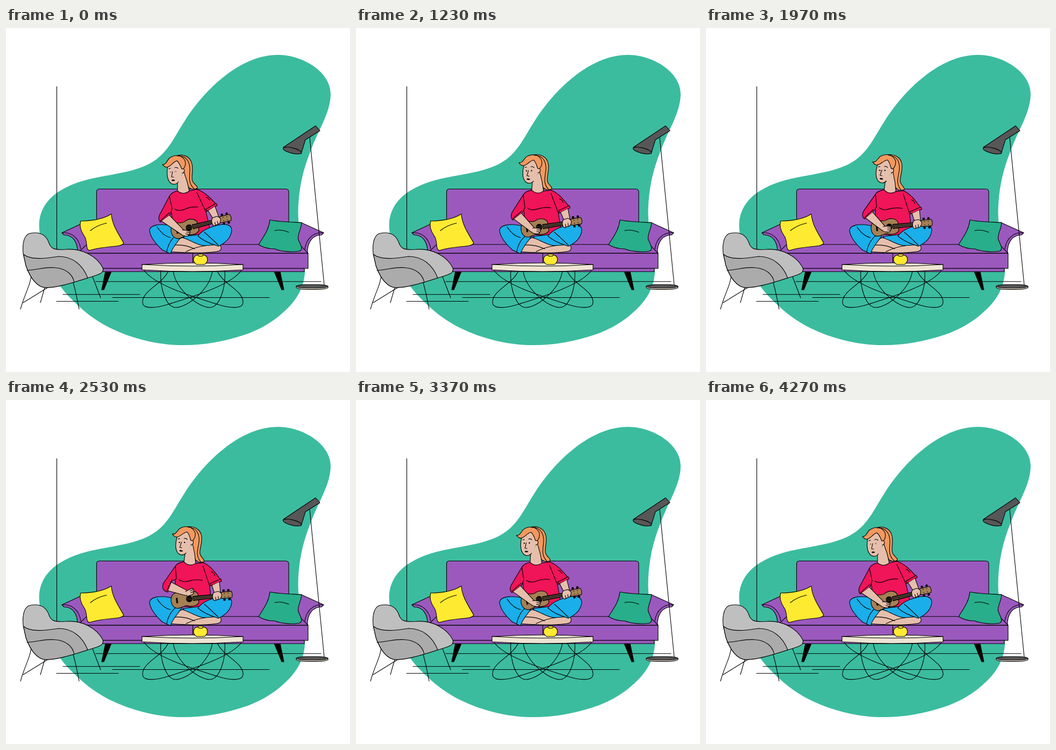
Write an HTML page that moves like this. It is 640x640 px and loops after 4.33 s.

```html
<!DOCTYPE html>
<html lang="en">
<head>
<meta charset="utf-8">
<title>Ukulele on the sofa</title>
<style>
  html, body { margin: 0; width: 100%; height: 100%; overflow: hidden; background: #fff; }
  svg { display: block; width: 100%; height: 100%; }
  .ink { stroke: #000; stroke-width: 1.1; stroke-linejoin: round; stroke-linecap: round; fill: none; }
  .ink .purple { fill: #9b59be; }
  .ink .red { fill: #f01458; }
  .ink .blue { fill: #1aaeea; }
  .ink .skin { fill: #e6bfac; }
  .ink .hair { fill: #f2995f; }
  .ink .wood { fill: #a58055; }
  .ink .yellow { fill: #ffea32; }
  .ink .dark { fill: #575757; }
  .ink .black { fill: #000; }
  .ink .cream { fill: #eee4d3; }
</style>
</head>
<body>
<svg viewBox="0 0 640 640">
  <path fill="#3bbc9f" d="M62 375C59 343 75 318 102 302C150 273 207 277 255 258C299 241 311 205 333 172C368 117 434 50 506 50C552 50 605 82 604 124C603 158 583 186 567 228C552 265 544 300 543.500 345C544 385 556 420 556 455C554 485 540 507 518 527C497 547 470 562 443 571C407 583 370 590 330 590C262 590 190 565 145 526C115 500 100 482 84 455C68 428 64 395 62 375Z"/>

  <g class="ink">
    <path d="M94.500 109V412M167 471.700H586M106 495.700H249M94 508.500H209M198 501.500H490"/>

    <!-- sofa -->
    <path class="black" d="M185 453H196L182 487H178ZM499 453H510L517 487H513Z"/>
    <path class="purple" d="M168.500 418V305Q168.500 299.500 174 299.500H520Q526 299.500 526 305V418Z"/>
    <path class="purple" d="M104 381L145 362H168V419H133C134 398 124 385 108 385Z"/>
    <path class="purple" d="M591 381L549 362L526 365V419H561C560 398 571 385 587 385Z"/>
    <path d="M104 381C121 379 136 390 139 411M591 381C574 379 559 390 556 411"/>
    <path class="purple" d="M133 419L150 402.800H546L562 419Z"/>
    <path class="purple" d="M132 419.300H562V447.300H132Z"/>
    <path class="purple" d="M168 447.300H555V453.300H168Z"/>
    <path d="M347.500 419V447"/>

    <!-- pillows -->
    <path class="yellow" d="M139 359C158 359 180 356 196 346C197 366 210 384 219 400C216 409 186 404 155 414C147 412 153 396 145 386C139 377 136 368 139 359ZM157 377Q169 367 187 363"/>
    <path fill="#28ae8b" d="M491 357C508 361 533 361 550 362C549 376 541 385 544 394C549 405 553 412 546 415C530 418 510 415 500 411C489 411 478 408 470 403C478 389 489 377 491 357ZM500 377Q511 374 526 380"/>

    <!-- floor lamp -->
    <path d="M565 204L592 478"/>
    <path class="cream" d="M540 480.500V483C542 487.500 597 487.500 599 483V480.500Z"/>
    <ellipse class="dark" cx="569.500" cy="480.500" rx="29.500" ry="3.300"/>
    <path class="dark" d="M576 182L584 191L557 208L549 234L516 222Z"/>
    <ellipse class="dark" cx="532.500" cy="228" rx="17.500" ry="5" transform="rotate(14 532.500 228)"/>

    <!-- chair -->
    <path d="M47 450C48 477 37 487 27 523M32 511L79 482M72 483L64 511M122 465Q128 480 136 523M160 460L176 502"/>
    <path fill="#bfbfbf" d="M32 420C30 400 34 384 45 382C65 378 75 386 80 400C84 412 92 413 110 412C142 409 169 425 180 446C183 455 175 458 162 462C130 472 100 482 75 483C58 483 45 465 37 442Z"/>
    <path fill="#ababab" d="M32.500 421C45 432 73 429 98 425C124 425 143 441 152 465C118 476 94 483 75 483C58 483 45 465 37 442Z"/>
    <path d="M39 451C62 449 76 444 92 446C113 448 124 459 127 473"/>
  </g>

  <g class="ink">
    <!-- torso and head -->
    <g id="body">
      <path class="hair" d="M312 241C325 231 343 238 346 253C349 266 344 276 347 285C351 293 357 293 356 298C348 302 340 300 336 290L326 262Z"/>
      <path class="red" d="M319 303Q307 306 304 313L313 385H382L372 342L392 329C380 316 370 305 355 300L341 303Z"/>
      <path class="skin" d="M319 286V303Q330 312 341 303L337 286L331 268"/>
      <path class="skin" d="M301 256C299 268 299 283 307 289C312 292 317 291 321 286L328 271C334 268 333 260 327 262L319 246Z" stroke="none"/>
      <path d="M301 256C299 268 299 283 307 289C312 292 317 291 321 286M328 270C334 268 333 260 327 262"/>
      <path class="hair" d="M291 254C298 255 299 247 304 242C317 233 329 238 333 247C335 253 333 259 330 262L327 262C324 256 323 251 318 247C310 249 307 258 299 259Q295 259 291 254Z"/>
      <path d="M318 238C338 236 343 253 342 267C341 280 340 290 350 299M314 260Q317 258 320 261M303 262L306 261M310 267L308 277L312 277.500"/>
      <ellipse class="black" cx="311" cy="283.300" rx="2.800" ry="1" stroke-width=".8"/>
      <g stroke="none" fill="#000">
        <ellipse class="eye" cx="306.300" cy="268" rx="1.200"/>
        <ellipse class="eye" cx="315.800" cy="267" rx="1.200"/>
      </g>
      <path d="M314 337Q322 342 333 337T357 333M355 306L372 342M372 315Q377 316 379 321"/>
      <path class="red" d="M391 326L393 330L374 341L372 337Z"/>
      <path id="sleeve" class="red"/>
    </g>

    <!-- legs -->
    <path class="blue" d="M329 388L362 384L397 403L350 410Z"/>
    <path class="skin" d="M304 416C309 404 318 393 328 390C341 393 352 403 368 405L398 403C402 409 401 415 392 416C364 420 332 418 304 416Z"/>
    <path d="M312 404Q332 402 351 411M335 416Q353 407 371 405"/>
    <path class="blue" d="M267 376C269 366 286 364 303 367C316 370 327 373 330 377C329 391 312 401 306 420L291 413C280 403 268 390 267 376Z"/>
    <path class="blue" d="M357 387C364 377 377 371 393 367C410 363 420 366 420 377C418 392 406 401 395 406C382 402 368 397 357 387Z"/>
    <path d="M281 370Q292 387 306 390M326 380Q304 390 299 416M369 380Q382 391 395 404"/>

    <!-- ukulele -->
    <g id="uke">
      <path class="wood" d="M17 -7C14 -15 2 -17 -5 -13C-11 -10 -16 -15 -24 -14C-37 -12 -38 12 -24 15C-16 16 -11 11 -5 12C4 16 15 14 17 8Z"/>
      <circle class="black" r="5.500"/>
      <path class="black" d="M-24 -4H-22V5H-24Z"/>
      <path fill="#2b2320" d="M7 -4L58 -3V3L7 4Z"/>
      <path stroke="#a58055" stroke-width=".5" d="M-22 -1.500H57M-22 1.500H57"/>
      <path class="wood" d="M57 -4L62 -6H79Q82 0 79 6H62L57 4Z"/>
      <path stroke-width="4.500" d="M65 -8.500h.1M74 -8.500h.1M65 8.500h.1M74 8.500h.1"/>
      <path stroke-width="1.500" d="M66 -3h.1M73 -3h.1M66 3h.1M73 3h.1"/>
    </g>

    <!-- arms -->
    <path id="fretArm" class="skin"/>
    <path id="fretHand" class="skin" d="M47 -7C43 -4 42 5 46 8C49 9 51 6 54 7C58 7 60 3 61 -2C59 -6 56 -8 54 -8ZM49 7V2M54 6V1"/>
    <path id="strumArm" class="skin"/>
    <path id="strumHand" class="skin" d="M-2 -4.500C3 -6 8 -6 13 -5Q14 -3 11 -2.500Q14 -2 13 0Q12.500 1.500 10 1Q12 2 11 4C8 5.500 3 5.500 -2 4.500M6 -2.500H11M6 1H10"/>
  </g>

  <!-- table -->
  <g class="ink">
    <path id="wire" d="M302 452C291 477 254 488 254 510C254 523 277 522 302 514C350 499 419 478 438 451M288 452C286 482 297 520 316 520C337 520 379 487 384 452"/>
    <use href="#wire" transform="matrix(-1 0 0 1 695 0)"/>
    <path class="cream" d="M253 440Q347 434 441 440V450Q347 456 253 450Z"/>
    <path d="M253 440Q347 446 441 440"/>
    <path class="yellow" d="M355 440C346 435 347 424 357 422H367C377 424 377 435 369 440Z"/>
    <ellipse class="yellow" cx="362" cy="422.500" rx="5" ry="2"/>
  </g>
</svg>

<script>
  const LOOP = 4330, BEAT = LOOP / 8, LEAN = 7.4, HIP = [340, 400];
  const el = id => document.getElementById(id);
  const set = (id, name, value) => el(id).setAttribute(name, value);
  const eyes = document.querySelectorAll('.eye');

  const mix = (a, b, k) => a + (b - a) * k;
  const mixPt = (p, q, k) => [mix(p[0], q[0], k), mix(p[1], q[1], k)];
  const ease = t => { const a = t ** 1.9, b = (1 - t) ** 1.9; return a / (a + b); };
  const poly = pts => 'M' + pts.map(p => p.join(' ')).join('L');

  // Eases 0 to 1 and back, each way taking `half` ms
  function swing(time, half) {
    const n = Math.floor(time / half), e = ease(time / half - n);
    return n % 2 ? 1 - e : e;
  }

  function turn([x, y], deg, [cx, cy]) {
    const a = deg * Math.PI / 180, c = Math.cos(a), s = Math.sin(a);
    return [cx + (x - cx) * c - (y - cy) * s, cy + (x - cx) * s + (y - cy) * c];
  }

  function draw(time) {
    const sway = swing(time, LOOP / 2), strum = swing(time, BEAT);
    const lean = LEAN * sway;
    const onBody = p => turn(p, lean, HIP);
    set('body', 'transform', `rotate(${lean} ${HIP})`);

    const hole = [340.5 + 0.5 * sway, 371.5 - 1.5 * sway], tilt = -14 + 8.2 * sway;
    const ukePose = `translate(${hole}) rotate(${tilt})`;
    const onUke = ([x, y]) => turn([x + hole[0], y + hole[1]], tilt, hole);
    set('uke', 'transform', ukePose);
    set('fretHand', 'transform', ukePose);
    set('fretArm', 'd', poly([onBody([376, 340]), onUke([48, -4]), onUke([59, -3]), onBody([389, 332])]));

    // Strumming arm: the cuff turns with the forearm
    const low = mixPt([287, 361], [298, 363], strum);
    const high = mixPt([306, 347], [300, 340], strum);
    const elbow = mixPt([282, 356], [283, 362], strum);
    const band = [mixPt(low, [288, 350], .22), mixPt(high, [300, 330], .22)];
    set('sleeve', 'd', `M304 313L286 347Q${elbow} ${low}L${high}L309 336Z` + poly(band));

    const a = onBody(mixPt(low, high, .12)), b = onBody(mixPt(low, high, .9));
    const wrist = mixPt([329, 380.5], [337 + 3 * sway, 355], strum);
    const mid = mixPt(a, b, .5);
    const dir = Math.atan2(wrist[1] - mid[1], wrist[0] - mid[0]);
    const side = k => [wrist[0] - Math.sin(dir) * k, wrist[1] + Math.cos(dir) * k];
    set('strumArm', 'd', poly([b, side(-4.5), side(4.5), a]));
    set('strumHand', 'transform', `translate(${wrist}) rotate(${mix(14, -32, strum)})`);

    const shut = Math.min(time, LOOP - time) < 130;
    eyes.forEach(e => e.setAttribute('ry', shut ? .5 : 1.2));
  }

  function frame() {
    draw(performance.now() % LOOP);
    requestAnimationFrame(frame);
  }
  frame();
</script>
</body>
</html>
```
